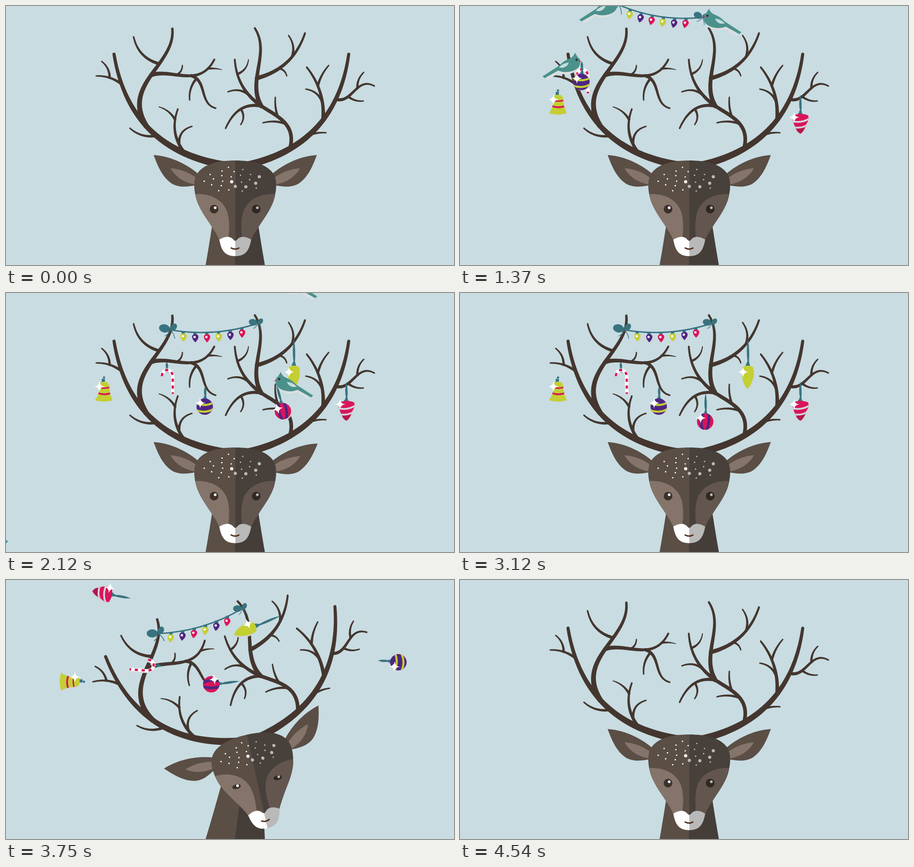
An HTML page with a canvas for the animation above (4.58 s loop, 983 px wide and 570 px high).

```html
<!DOCTYPE html>
<html lang="en">
<head>
<meta charset="utf-8">
<title>Festive deer</title>
<style>
html, body { margin: 0; width: 100%; height: 100%; overflow: hidden; background: #c8dce2; }
canvas { display: block; }
</style>
</head>
<body>
<canvas id="stage" width="983" height="570"></canvas>
<script>
const ctx = document.getElementById('stage').getContext('2d');
const LOOP = 4580, RAD = Math.PI / 180;
const TEAL = '#39737f', LIME = '#c3cf32', PINK = '#d9155b', PURPLE = '#4f2582',
      SHADE = '#d2d4d8', ANTLER = '#44362e', FUR = '#5a4e45';

const clamp = (v, a = 0, b = 1) => Math.min(b, Math.max(a, v));
const lerp = (a, b, k) => a + (b - a) * k;
const mix = (p, q, k) => p.map((v, i) => lerp(v, q[i], k));
const bump = (t, from, to) => Math.sin(Math.PI * clamp((t - from) / (to - from)));

function fill(d, color) { ctx.fillStyle = color; ctx.fill(new Path2D(d)); }
function line(d, color, width) {
  ctx.strokeStyle = color; ctx.lineWidth = width; ctx.stroke(new Path2D(d));
}
function oval(x, y, rx, color, ry = rx, turn = 0) {
  ctx.fillStyle = color;
  ctx.beginPath(); ctx.ellipse(x, y, rx, ry, turn, 0, 7); ctx.fill();
}
function at(x, y, degrees, draw) {
  ctx.save(); ctx.translate(x, y); ctx.rotate(degrees * RAD); draw(); ctx.restore();
}
function mirrored(draw) {
  ctx.save(); ctx.translate(1006, 0); ctx.scale(-1, 1); draw(); ctx.restore();
}

// ---- Antlers: tapered cubic curves, each rooted on its parent ----
const antlers = [];
// base: a point, or [parent, position]; bows: sideways bend as a share of the length
function grow(base, tip, bowTip, bowBase = bowTip, tipWidth) {
  if (base[0].point) base = base[0].point(base[1]);
  const dx = base[0] - tip[0], dy = base[1] - tip[1], length = Math.hypot(dx, dy);
  const thin = tipWidth ?? 2.5 + length / 80, thick = 4 + length / 28;
  const point = t => {
    const s = 1 - t, bend = 3 * s * t * (s * bowTip + t * bowBase);
    return [tip[0] + dx * t - dy * bend, tip[1] + dy * t + dx * bend];
  };
  const path = new Path2D(), far = [], steps = 30;
  for (let i = 0; i <= steps; i++) {
    const t = i / steps, [x, y] = point(t), p = point(t - 0.01), q = point(t + 0.01);
    const dir = Math.atan2(q[1] - p[1], q[0] - p[0]), r = lerp(thin, thick, t) / 2;
    if (i === 0) path.arc(x, y, r, dir + Math.PI / 2, dir + Math.PI * 1.5);
    path.lineTo(x + r * Math.sin(dir), y - r * Math.cos(dir));
    if (i === steps) path.arc(x, y, r, dir - Math.PI / 2, dir + Math.PI / 2);
    far.unshift([x - r * Math.sin(dir), y + r * Math.cos(dir)]);
  }
  far.forEach(p => path.lineTo(...p));
  antlers.push(path);
  return { point };
}
function growLeft() {
  const beam = grow([480, 350], [237, 106], 0.239);
  const stem = grow([beam, 0.47], [365, 50], -0.126, 0.351);
  grow([stem, 0.37], [280, 68], 0.2);
  const arm = grow([stem, 0.5], [457, 118], -0.385, 0.033);
  grow([arm, 0.62], [387, 131], -0.2);
  grow([arm, 0.13], [473, 140], 0.06, 0.06, 1.5);
  const hook = grow([arm, 0.4], [460, 225], -0.26, 0.24);
  grow([hook, 0.87], [403, 207], -0.14);
  const side = grow([beam, 0.17], [198, 154], -0.12);
  grow([side, 0.5], [210, 122], -0.16);
  grow([beam, 0.56], [272, 269], 0.16);
  const inner = grow([beam, 0.77], [377, 227], 0.19);
  grow([inner, 0.22], [336, 222], -0.13, -0.13, 2);
  grow([inner, 0.78], [408, 265], 0.27);
}
function growRight() {
  const beam = grow([530, 350], [752, 106], -0.229);
  const trunk = grow([beam, 0.73], [560, 220], -0.138, -0.38, 8);
  const stem = grow([trunk, 0], [546, 49], -0.177, 0.16);
  const arm = grow([stem, 0.64], [656, 60], -0.18);
  grow([arm, 0.39], [620, 65], -0.17);
  grow([arm, 0.65], [616, 154], 0.2);
  const fork = grow([trunk, 0], [502, 118], 0.16);
  grow([fork, 0.26], [532, 118], -0.2, -0.2, 2);
  grow([fork, 0.71], [487, 189], -0.2);
  const hook = grow([trunk, 0], [482, 269], -0.22, -0.3);
  grow([hook, 0.55], [515, 261], 0.22);
  grow([trunk, 0.35], [591, 201], 0.07);
  grow([trunk, 0.55], [564, 257], -0.1);
  const inner = grow([beam, 0.44], [660, 135], -0.13);
  grow([inner, 0.38], [708, 131], 0.08);
  grow([inner, 0.7], [658, 183], -0.2);
  const side = grow([beam, 0.28], [808, 176], 0.37, -0.25);
  grow([side, 0.41], [785, 146], 0.15);
  grow([side, 0.69], [784, 209], -0.14);
  grow([beam, 0.58], [702, 279], 0.08);
}
growLeft();
growRight();

// ---- Head shake ----
function pose(t) {
  const phase = (t - 3370) / 400 * 360;
  const env = clamp((t - 3370) / 60) * clamp((4430 - t) / 300);
  const wave = lag => env * Math.sin((phase - lag) * RAD);
  const drag = env * Math.cos((phase - 30) * RAD);
  return {
    angle: 42 * wave(0), dx: -50 * wave(15), dy: 3.8 * wave(0) ** 2, swing: 99 * drag,
    leftEar: -19 * drag - 11 * env,
    rightEar: -18 * drag + 2 * env + 11.5 * bump(t, 2100, 2500),
    eye: 1 - 0.45 * env - 0.9 * Math.max(bump(t, 1480, 1620), bump(t, 2400, 2540))
  };
}
function headPoint([x, y], t) {
  const p = pose(t), c = Math.cos(p.angle * RAD), s = Math.sin(p.angle * RAD);
  x -= 503; y -= 345;
  return [503 + p.dx + x * c - y * s, 345 + p.dy + x * s + y * c];
}

// ---- Deer ----
function neckHalf(color) { fill('M462 420Q447 520 438 570H503.5V420Z', color); }
function ear(angle) {
  at(425, 385, angle, () => {
    ctx.translate(-425, -385);
    fill('M324 328C365 331 400 350 425 372L418 394C395 399 375 400 360 388C342 374 332 350 324 328Z', FUR);
    fill('M361 357C385 359 405 368 420 380L416 393C395 390 372 378 361 357Z', '#85746a');
  });
}
function faceHalf(fur, cheek, muzzle) {
  fill('M503.3 340C465 340 435 348 421 367C411 381 412 400 416 418C421 445 443 470 453 488C460 500 464 507 468 514L503.3 540Z', fur);
  fill('M416 414C450 412 478 428 486 455C492 478 489 495 488 512L468 515C462 500 455 492 449 482C436 462 420 442 416 414Z', cheek);
  fill('M468 514Q486 503 497 512Q501 517 503.3 517V550.5C480 551 472 537 468 514Z', muzzle);
}
// Freckles spread on a golden-angle spiral, every fifth one large
function freckles() {
  for (let i = 0; i < 25; i++) {
    const r = Math.sqrt((i + 0.5) / 25), x = 499 + 65 * r * Math.cos(i * 2.4 + 2);
    oval(x, 383 + 30 * r * Math.sin(i * 2.4 + 2), i % 5 ? 1.6 : 3.5, x < 503 ? '#fff' : '#b9b9b9');
  }
}
function eye(x, iris, shine, open) {
  oval(x, 447, 9.5, iris, 9.5 * open);
  oval(x + 2.5, 447 - 3 * open, 3, shine, 3 * Math.min(1, open * 1.8));
}
function deer(p) {
  ctx.save();
  ctx.transform(1, 0, -p.dx / 210, 1, 570 * p.dx / 210, 0);
  neckHalf(FUR);
  mirrored(() => neckHalf('#453d38'));
  ctx.restore();
  at(503 + p.dx, 345 + p.dy, p.angle, () => {
    ctx.translate(-503, -345);
    ctx.fillStyle = ANTLER;
    antlers.forEach(path => ctx.fill(path));
    ear(p.leftEar);
    mirrored(() => ear(-p.rightEar));
    mirrored(() => faceHalf('#47403b', '#63564e', '#b9b9b9'));
    faceHalf(FUR, '#85746a', '#fff');
    freckles();
    eye(456.5, '#3d312b', '#fff', p.eye);
    eye(549, '#302822', '#b9b9b9', p.eye);
    line('M493 532Q503 538 512 532', '#4d2d1a', 3);
  });
}

// ---- Decorations, hanging from the point 0,0 ----
function ribbon(h) {
  fill(`M0 0Q-5 ${h / 2} -1 ${h}H2Q4 ${h / 2} 0 0`, TEAL);
  oval(0, h + 2, 3, TEAL);
  fill(`M-5 ${h + 4}h9v6h-9Z`, TEAL);
}
function body(d, color, details) {
  ctx.save(); ctx.translate(2.5, 1.5); fill(d, SHADE); ctx.restore();
  fill(d, color);
  ctx.save(); ctx.clip(new Path2D(d)); details?.(); ctx.restore();
}
function sparkle(x, y) {
  at(x, y, 0, () => {
    for (let i = 0; i < 4; i++) {
      ctx.rotate(Math.PI / 2);
      fill('M0-12Q1.5-3 4-4L0 1L-4-4Q-1.5-3 0-12', '#fff');
    }
  });
}
function ball(h, color, stripes) {
  ribbon(h);
  const y = h + 23;
  body(`M-19 ${y}a18 18 0 1 1 36 0a18 18 0 1 1-36 0`, color, () => at(0, y, 0, stripes));
  sparkle(-11, y - 8);
}
const draw = {
  bell() {
    oval(0, 2, 2.5, TEAL); fill('M-5 5h7v8h-7Z', TEAL);
    body('M-7 13Q0 9 8 13Q12 18 12 30Q14 42 19 52Q0 58-20 52Q-12 42-11 30Q-12 18-7 13', LIME, () => {
      line('M-13 23Q0 28 14 23', PINK, 3);
      line('M-14 36Q1 42 16 36', PINK, 4);
    });
    sparkle(-10, 22);
  },
  tree() {
    ribbon(36);
    body('M-18 47Q0 38 17 46Q20 56 12 66Q9 80 0 86Q-8 82-10 74Q-17 62-18 47', PINK, () => {
      fill('M-14 72Q4 75 16 66V90H-14Z', '#b5174a');
      line('M-18 59Q4 63 19 53', SHADE, 4);
      line('M-16 72Q4 75 16 66', SHADE, 4);
    });
    sparkle(-14, 50);
  },
  candy() {
    ribbon(13);
    const cane = 'M-11 31C-11 14 12 12 13 32V70';
    ctx.save(); ctx.translate(2, 1); line(cane, SHADE, 7); ctx.restore();
    line(cane, '#fff', 7);
    ctx.setLineDash([7, 8]); line(cane, PINK, 5); ctx.setLineDash([]);
  },
  purpleBall() {
    ball(22, PURPLE, () => {
      line('M-20-7Q2 1 20-10', LIME, 4.5);
      line('M-20 8Q2 16 20 4', LIME, 4.5);
    });
  },
  pinkBall() {
    ball(40, PINK, () => {
      line('M-5-20Q-14 0-6 20', PURPLE, 6);
      line('M6-20Q10 0 2 20', PURPLE, 6);
    });
  },
  drop() {
    ribbon(52);
    body('M-12 63Q0 56 11 63Q15 80 9 94Q5 106-1 111Q-9 104-12 90Q-15 76-12 63', LIME);
    sparkle(-11, 74);
  }
};

function bow(size) {
  ctx.save(); ctx.scale(size, size);
  oval(-12, -4, 12, TEAL, 9, 0.3);
  oval(8, -5, 9, TEAL, 6.5, -0.8);
  line('M0 0Q-3 10-13 13M0 0Q8 8 9 20', TEAL, 1.5);
  ctx.restore();
}
function garland([ax, ay], [bx, by], swing) {
  const len = Math.hypot(bx - ax, by - ay);
  at(ax, ay, Math.atan2(by - ay, bx - ax) / RAD, () => {
    line(`M0 0Q${len / 2} 24 ${len} 0`, TEAL, 3);
    for (let i = 0; i < 6; i++) {
      const u = 0.15 + 0.134 * i;
      at(u * len, 48 * u * (1 - u), 4 + swing * 0.3, () => {
        fill('M-4-1h7v7h-7Z', TEAL);
        body('M-7 9Q-6 4 0 4Q6 4 7 9Q7 15 0 22Q-7 15-7 9', [LIME, PURPLE, PINK][i % 3]);
        oval(-1.5, 10, 2.6, '#fff');
      });
    }
    bow(1);
    ctx.translate(len, 0);
    bow(0.8);
  });
}

// ---- Birds: a route of [ms, point] stops; they face right (1) or left (-1) ----
const hook = {
  bell: [215, 184], tree: [747, 195], candy: [353, 152], purpleBall: [437, 205],
  drop: [632, 100], pinkBall: [539, 220], leftBow: [360, 81], rightBow: [552, 67]
};
const GRAB = 4180;
function bird(dir, ...route) { return { dir, route, turn: Infinity, tilt: -17 }; }
const bellBird = bird(1, [60, [-10, 560]], [530, hook.bell], [1000, [-100, 440]]);
const treeBird = bird(-1, [60, [990, 330]], [560, hook.tree], [1130, [-90, 50]]);
const leftCarrier = bird(1, [1150, [318, -110]], [1370, [348, -3]], [1600, hook.leftBow], [1900, [380, -120]]);
const rightCarrier = bird(-1, [1150, [500, -100]], [1370, [531, 25]], [1600, hook.rightBow], [1900, [590, -120]]);
const dropBird = bird(-1, [1640, [760, -60]], [1980, hook.drop], [2120, [597, -24]], [2180, [577, -95]]);
const candyBird = bird(1, [1110, [-20, 50]], [1370, [267, 122]], [1550, hook.candy],
  [1750, hook.purpleBall], [2120, [-80, 513]], [2160, [-139, 548]]);
const ballBird = bird(-1, [1850, [700, -60]], [2120, [588, 193]], [2280, hook.pinkBall], [2950, [-100, 240]]);
const leftThief = bird(1, [3925, [-10, 20]], [4040, [302, 79]], [GRAB, headPoint(hook.leftBow, GRAB)], [4400, [420, -140]]);
const rightThief = bird(-1, [3980, [330, -90]], [4040, [364, -25]], [GRAB, headPoint(hook.rightBow, GRAB)], [4400, [610, -140]]);
bellBird.turn = 530;
candyBird.turn = 1750;
leftThief.tilt = 0;
const birds = [bellBird, treeBird, leftCarrier, rightCarrier, dropBird, candyBird, ballBird, leftThief, rightThief];

function beak({ route }, t) {
  const i = Math.max(1, route.findIndex(stop => stop[0] >= t));
  const [from, p] = route[i - 1], [to, q] = route[i];
  return mix(p, q, clamp((t - from) / (to - from)));
}
function drawBird(b, t) {
  if (t < b.route[0][0] || t > b.route.at(-1)[0]) return;
  at(...beak(b, t), 0, () => {
    ctx.scale(t < b.turn ? b.dir : -b.dir, 1);
    ctx.rotate(b.tilt * RAD);
    fill('M-58 0L-88 14L-82 17L-56 9Q-44 20-27 18Q-10 16-6 2Z', '#dcdfe0');
    fill('M-92 6L-50-6Q-38-13-25-14Q-14-15-9-23L-6-12Q-1-6-4 0Q-7 13-25 14Q-43 14-56 4L-89 11Z', '#4b918b');
    fill('M-52-2Q-41-9-28-6Q-34 2-44 1Z', '#c4dcdc');
    fill('M-5-5L0 1L-5-1Z', '#e0245e');
    oval(-10, -7, 2.5, '#33302e');
  });
}

// Flung off at "release"; passes "to" [x, y, angle] at "toTime"
const items = [
  { name: 'bell', by: bellBird, release: 3700, toTime: 3750, to: [174, 227, 90] },
  { name: 'tree', by: treeBird, release: 3620, toTime: 3750, to: [277, 41, 101] },
  { name: 'candy', by: candyBird, release: 3900, toTime: 4040, to: [848, 128, -97], amp: 1.4 },
  { name: 'purpleBall', by: candyBird, release: 3480, toTime: 3750, to: [815, 177, -86] },
  { name: 'drop', by: dropBird, release: 4080, toTime: 4230, to: [900, -20, -100] },
  { name: 'pinkBall', by: ballBird, release: 3742, toTime: 3750, to: [515, 222, 83], tilt: -14 }
];
function itemState({ name, by, release, toTime, to, amp = 1, tilt = 0 }, t) {
  const placed = by.route.find(stop => stop[1] === hook[name])[0];
  if (t < placed) {
    const [x, y] = beak(by, t), lean = tilt * clamp((placed - t) / 100);
    return [x - lean * 0.4, y - lean * 0.4, lean];
  }
  const held = Math.min(t, release), k = Math.max(0, (t - release) / (toTime - release));
  const from = [...headPoint(hook[name], held), pose(held).swing * amp];
  const [x, y] = mix(from, to, k);
  return [x, y, lerp(from[2], to[2], Math.min(1, k))];
}
function drawGarland(t) {
  if (t < 1150 || t > 4400) return;
  const carriers = t < 1600 ? [leftCarrier, rightCarrier] : t > GRAB && [leftThief, rightThief];
  const ends = carriers ? carriers.map(b => beak(b, t))
    : [hook.leftBow, hook.rightBow].map(p => headPoint(p, t));
  garland(...ends, pose(t).swing);
}

function render(t) {
  ctx.fillStyle = '#c8dce2';
  ctx.fillRect(0, 0, 983, 570);
  deer(pose(t));
  drawGarland(t);
  for (const item of items) {
    if (t >= item.by.route[0][0] && t < 4440) at(...itemState(item, t), draw[item.name]);
  }
  birds.forEach(b => drawBird(b, t));
}
const start = performance.now();
function tick() {
  render((performance.now() - start) % LOOP);
  requestAnimationFrame(tick);
}
tick();
</script>
</body>
</html>
```
